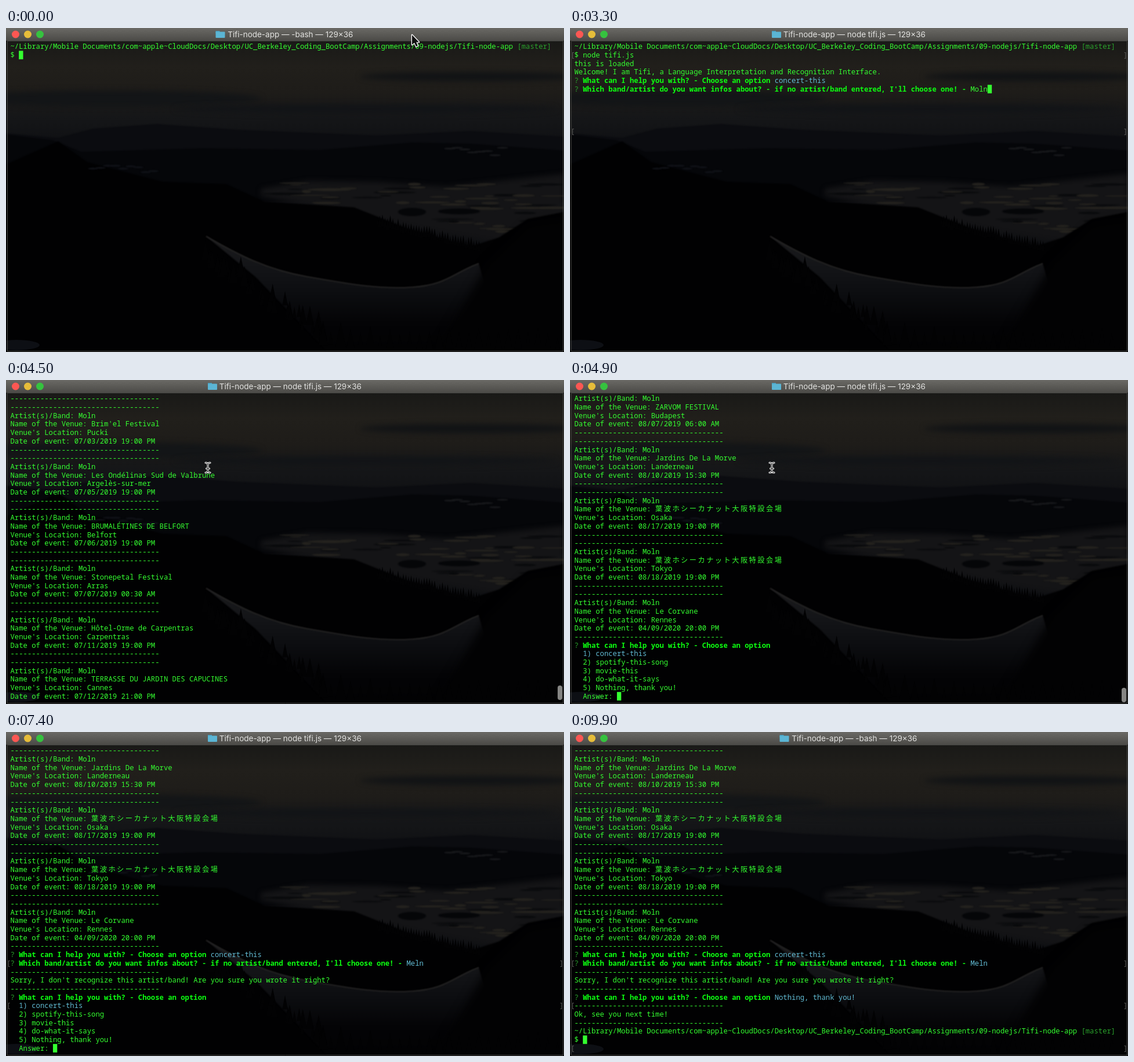
An HTML page with a canvas for the animation above (10 s loop, 962x560 px).

```html
<!DOCTYPE html>
<html lang="en">
<head>
<meta charset="utf-8">
<title>Terminal session</title>
<style>
  html, body { margin: 0; width: 100%; height: 100%; overflow: hidden; background: #000; }
  canvas { display: block; }
</style>
</head>
<body>
<canvas id="stage" width="962" height="560"></canvas>
<script>
const W = 962, H = 560, LOOP = 10000, STEP = 100;
const ROWS = 36, CELL = 7.344, PITCH = 14.7, LEFT = 7.5, TOP = 24.7;
const GREEN = '#34ff30', DIM = '#2aa22c', CYAN = '#62bcd4', BOLD = '#0cff10';
const MONO = '12.24px "Noto Sans Mono", "Noto Sans CJK JP", monospace';
const ctx = document.getElementById('stage').getContext('2d');

const RULE = '-'.repeat(35);
const PATH = '~/Library/Mobile Documents/com~apple~CloudDocs/Desktop/' +
  'UC_Berkeley_Coding_BootCamp/Assignments/09-nodejs/Tifi-node-app ';
const CHOICES = ['concert-this', 'spotify-this-song', 'movie-this', 'do-what-it-says', 'Nothing, thank you!'];
const HALL = '葉波ホシーカナット大阪特設会場';
const EVENTS = [
  ['Prairie du Lac Vernel', 'Nantes', '06/29/2019 19:00 PM'],
  ["Brim'el Festival", 'Pucki', '07/03/2019 19:00 PM'],
  ['Les Ondélinas Sud de Valbrune', 'Argelès-sur-mer', '07/05/2019 19:00 PM'],
  ['BRUMALÉTINES DE BELFORT', 'Belfort', '07/06/2019 19:00 PM'],
  ['Stonepetal Festival', 'Arras', '07/07/2019 00:30 AM'],
  ['Hôtel-Orme de Carpentras', 'Carpentras', '07/11/2019 19:00 PM'],
  ['TERRASSE DU JARDIN DES CAPUCINES', 'Cannes', '07/12/2019 21:00 PM'],
  ['ZARVOM FESTIVAL', 'Budapest', '08/07/2019 06:00 AM'],
  ['Jardins De La Morve', 'Landerneau', '08/10/2019 15:30 PM'],
  [HALL, 'Osaka', '08/17/2019 19:00 PM'],
  [HALL, 'Tokyo', '08/18/2019 19:00 PM'],
  ['Le Corvane', 'Rennes', '04/09/2020 20:00 PM'],
];

const clamp = x => Math.max(0, Math.min(1, x));
const ease = x => (x = clamp(x)) * x * (3 - 2 * x);
const typed = (text, t, start, gap) => text.slice(0, Math.max(0, Math.floor((t - start) / gap) + 1));

// Buffer at time t: lines of [text, colour] segments, the Enter marks and the first visible line.
function session(t) {
  const lines = [], marks = [];
  let top = 0;
  const say = (...segments) => lines.push(segments);
  const print = (...texts) => texts.forEach(text => say([text, GREEN]));
  const prompt = command => {
    say([PATH, GREEN], ['[master]', DIM]);
    print('$ ' + command);
  };
  const question = (text, ...rest) => say(['? ', DIM], [text + ' ', BOLD], ...rest);

  function menu(typeAt, enterAt, pick) {
    const title = 'What can I help you with? - Choose an option', last = lines.length + 6;
    top = Math.max(top, last + 1 - ROWS);
    if (t >= enterAt) {
      marks.push(last);
      question(title, [CHOICES[pick - 1], CYAN]);
      return true;
    }
    const current = t >= typeAt ? pick : 1;
    question(title);
    CHOICES.forEach((name, i) => say([`  ${i + 1}) ${name}`, i + 1 === current ? CYAN : GREEN]));
    print('  Answer: ' + (t >= typeAt ? pick : ''));
    return false;
  }

  function askBand(name, typeAt, gap, enterAt, replyAt) {
    const entered = t >= enterAt;
    question("Which band/artist do you want infos about? - if no artist/band entered, I'll choose one! -",
      [typed(name, t, typeAt, gap), entered ? CYAN : GREEN]);
    if (entered) marks.push(lines.length - 1);
    if (entered && t < replyAt) print('');
    return t >= replyAt;
  }

  (function play() {
    prompt(typed('node tifi.js', t, 400, 80));
    if (t < 1500) return;
    marks.push(1);
    if (t < 1700) return print('');
    print('this is loaded', 'Welcome! I am Tifi, a Language Interpretation and Recognition Interface.');
    if (!menu(2300, 2500, 1) || !askBand('Moln', 2700, 150, 3400, 3800)) return;
    for (const [venue, place, date] of EVENTS)
      print(RULE, 'Artist(s)/Band: Moln', 'Name of the Venue: ' + venue,
        "Venue's Location: " + place, 'Date of event: ' + date, RULE);
    if (!menu(5300, 5500, 1) || !askBand('Meln', 5800, 200, 6700, 7000)) return;
    print(RULE, "Sorry, I don't recognize this artist/band! Are you sure you wrote it right?", RULE);
    if (!menu(8200, 8600, 5)) return;
    print(RULE, 'Ok, see you next time!', RULE);
    prompt('');
  })();
  return { lines, marks, top };
}

function shape(g, fill, points) {
  g.fillStyle = fill;
  g.beginPath();
  for (let i = 0; i < points.length; i += 2) g.lineTo(points[i], points[i + 1]);
  g.fill();
}

function gradient(g, y0, y1, ...colours) {
  const fill = g.createLinearGradient(0, y0, 0, y1);
  colours.forEach((c, i) => fill.addColorStop(i / (colours.length - 1), c));
  return fill;
}

function ellipse(g, fill, x, y, rx, ry) {
  g.fillStyle = fill;
  g.beginPath();
  g.ellipse(x, y, rx, ry, 0, 0, 7);
  g.fill();
}

function paintLandscape() {
  const canvas = document.createElement('canvas');
  canvas.width = W;
  canvas.height = H;
  const g = canvas.getContext('2d');
  let seed = 7;
  const random = () => (seed = seed * 16807 % 2147483647) / 2147483647;
  const tree = (x, y, h) => shape(g, '#020203', [x, y - h, x + h / 4, y + 6, x - h / 4, y + 6]);

  g.fillStyle = gradient(g, 22, 200, '#191917', '#211f1b', '#1e1c19', '#151618', '#0f1013');
  g.fillRect(0, 0, W, H);
  g.filter = 'blur(5px)';
  ellipse(g, '#111315', 800, 84, 190, 8);
  ellipse(g, '#131517', 180, 122, 260, 14);
  ellipse(g, '#121417', 620, 140, 330, 8);
  g.filter = 'blur(1px)';
  shape(g, '#0b0c10', [0, 182, 90, 190, 150, 174, 260, 166, 400, 176, 640, 186, 800, 178, W, 188, W, 270, 0, 270]);
  shape(g, '#050609', [0, 184, 80, 194, 130, 214, 340, 208, 540, 211, 700, 198, 800, 200, W, 212, W, 300, 0, 300]);
  g.filter = 'blur(4px)';
  shape(g, '#141416', [440, 278, 520, 264, 640, 266, 760, 274, W, 252, W, 330, 860, 372, 740, 352, 440, 290]);
  g.filter = 'blur(1px)';
  for (let i = 0; i < 60; i++) {
    const x = 460 + random() * 490, depth = random() * (20 + (x - 460) / 6);
    ellipse(g, i % 3 ? '#24221e' : '#090a0c', x, 268 + depth, 8 + random() * 30, 0.8 + random() * 1.8);
  }
  ellipse(g, '#050608', 700, 318, 24, 7);
  ellipse(g, '#050608', 781, 317, 36, 5);
  for (let i = 0; i < 8; i++) ellipse(g, '#191a1d', 765 + i * 13, 206 + random() * 14, 10, 1.5);
  shape(g, '#010102', [0, 236, 90, 196, 140, 232, 270, 266, 380, 270, 445, 300, 600, 310, 690, 346, 800, 378,
    850, 362, 900, 330, W, 318, W, H, 0, H]);
  for (let i = 0; i < 9; i++) ellipse(g, '#111319', 150 + i * 13, 238 + random() * 12, 9, 1.5);

  // Snowy slope with its lit crest
  const crest = new Path2D('M345 360C400 392 450 418 520 430S640 452 700 448S770 424 815 407');
  const slope = new Path2D(crest);
  slope.lineTo(860, H);
  slope.lineTo(555, H);
  slope.lineTo(430, 430);
  g.fillStyle = gradient(g, 360, H, '#1b1b1d', '#141518', '#0c0d10', '#040406', '#020203');
  g.fill(slope);
  g.strokeStyle = '#302f2e';
  g.lineWidth = 1.5;
  g.stroke(crest);
  g.filter = 'blur(8px)';
  shape(g, '#020203', [830, 408, 900, 340, W, 330, W, H, 740, H]);
  g.filter = 'blur(0.6px)';
  for (let i = 0; i < 40; i++) tree(330 + i * 5.5 + random() * 18, 385 + i * 3.4 + random() * 26, 12 + random() * 20);
  for (let i = 0; i < 24; i++) tree(560 + i * 17, 540 + random() * 20, 14 + random() * 24);
  for (let i = 0; i < 40; i++) tree(640 + i * 4.5, 334 + i * 1.1 + random() * 5, 8 + random() * 8);
  ellipse(g, '#0d0f14', 18, 548, 40, 9);
  return canvas;
}

function drawText(text, col, row, colour) {
  ctx.fillStyle = colour;
  ctx.font = (colour === BOLD ? 'bold ' : '500 ') + MONO;
  for (const ch of text) {
    ctx.fillText(ch, LEFT + col * CELL, TOP + 11.6 + row * PITCH);
    col += ch > '\u2e80' ? 2 : 1;
  }
  return col;
}

function drawBuffer({ lines, marks, top }, back) {
  const first = top - back;
  ctx.textAlign = 'left';
  for (let row = 0; row < ROWS; row++) {
    const index = first + row;
    if (marks.includes(index)) {
      ctx.fillStyle = '#5c5c5a';
      ctx.font = MONO;
      ctx.fillText('[', 1, TOP + 11.6 + row * PITCH);
      ctx.fillText(']', 954, TOP + 11.6 + row * PITCH);
    }
    if (!lines[index]) continue;
    let col = 0;
    for (const [text, colour] of lines[index]) col = drawText(text, col, row, colour);
    if (index === lines.length - 1) {
      ctx.fillStyle = GREEN;
      ctx.fillRect(LEFT + col * CELL, TOP + row * PITCH, CELL, PITCH);
    }
  }
}

function drawWindow(running) {
  ctx.fillStyle = gradient(ctx, 0, 22, '#6a6965', '#5b5a56', '#4b4a47');
  ctx.fillRect(0, 0, W, 22);
  ctx.fillStyle = '#171717';
  ctx.fillRect(0, 22, W, 1);
  ctx.strokeStyle = '#454542';
  ctx.lineWidth = 1;
  ctx.strokeRect(2.5, 22.5, 958, 536);
  ['#fc5753', '#e6bd3a', '#36c23f'].forEach((c, i) => ellipse(ctx, c, 16.5 + i * 21, 11, 6.5, 6.5));

  const x = running ? 348 : 361.5;
  ctx.fillStyle = '#4a9fc0';
  ctx.fillRect(x, 5, 7, 4);
  ctx.fillStyle = '#5bb5d4';
  ctx.beginPath();
  ctx.roundRect(x, 6.5, 16, 10.5, 1);
  ctx.fill();
  ctx.font = '13.5px Inter, sans-serif';
  ctx.textAlign = 'center';
  ctx.fillStyle = '#e4e4e2';
  ctx.fillText(`Tifi-node-app — ${running ? 'node tifi.js' : '-bash'} — 129×36`, 490.3, 16);
}

const ARROW = new Path2D('M700 12V29L704 25.4L707 32L710 30.6L707.2 24.4H712Z');
const BEAM = new Path2D('M344 143Q348 143 348 146Q348 143 352 143M348 146V157M344 160Q348 160 348 157Q348 160 352 160M345.5 153H350.5');

function outlined(path, inner, width) {
  ctx.lineJoin = ctx.lineCap = 'round';
  ctx.strokeStyle = '#fff';
  ctx.lineWidth = width;
  ctx.stroke(path);
  ctx.strokeStyle = inner;
  ctx.lineWidth = 1;
  if (path === ARROW) {
    ctx.fillStyle = inner;
    ctx.fill(path);
  } else ctx.stroke(path);
}

const landscape = paintLandscape();

function draw(now) {
  const t = Math.floor(now % LOOP / STEP) * STEP;
  const back = Math.round(38 * (ease((t - 4200) / 300) - ease((t - 4500) / 300)));
  ctx.drawImage(landscape, 0, 0);
  drawBuffer(session(t), back);
  drawWindow(t >= 1500 && t < 8600);
  if (t >= 4300 && t < 5300) {
    ctx.fillStyle = '#858583';
    ctx.beginPath();
    ctx.roundRect(951, 532 - back * 4 / 38, 8, 25, 4);
    ctx.fill();
  }
  if (t < 400) outlined(ARROW, '#111', 2.6);
  if (t >= 4000 && t < 5300) outlined(BEAM, '#111', 3);
  requestAnimationFrame(draw);
}
requestAnimationFrame(draw);
</script>
</body>
</html>
```
